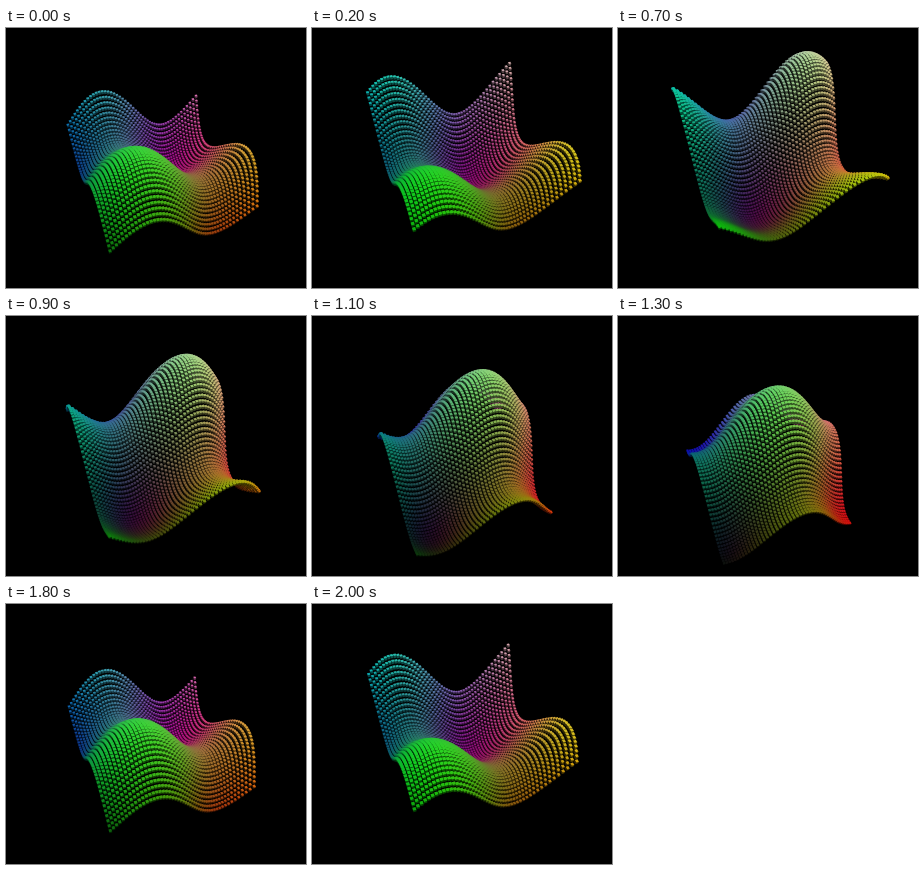
These frames come from a looping animation (300 by 260 pixels, 2.1 s). An HTML page with a canvas:

```html
<!DOCTYPE html>
<html lang="en">
<head>
<meta charset="utf-8">
<title>Wave of cubes</title>
<style>
  html, body { margin: 0; width: 100%; height: 100%; overflow: hidden; background: #000; }
  canvas { display: block; width: 300px; height: 260px; }
</style>
</head>
<body>
<canvas id="stage" width="300" height="260"></canvas>
<script>
const ctx = document.getElementById('stage').getContext('2d');
const LOOP = 2100, STEP = 100;
const N = 50;              // cubes per side
const HALF = 0.45 / N;     // half a cube in grid units
const RISE = 0.9 / N;      // half a cube in height units
const SPEED = 3.42, PHASE = -0.01;

// Perspective camera: x and z run 0..1 across the grid, h is -1..1
function project(x, z, h) {
  const w = 1 + 0.0945 * x + 0.1935 * z - 0.193 * h;
  return [
    (104 + 170.7 * x - 30 * z - 22.8 * h) / w,
    (223 - 28.2 * x - 107.2 * z - 73.3 * h) / w
  ];
}

function shade(rgb, gain, lift) {
  return 'rgb(' + rgb.map(v => Math.round(255 * Math.min(1, v * gain + lift))).join(',') + ')';
}

function quad(a, b, c, d, fill) {
  ctx.fillStyle = fill;
  ctx.beginPath();
  ctx.moveTo(a[0], a[1]);
  for (const p of [b, c, d]) ctx.lineTo(p[0], p[1]);
  ctx.fill();
}

function cube(x, z, h) {
  const rgb = [Math.pow(x, 1.2), Math.max(0, 0.5 + 0.5 * h), 0.8 * Math.pow(z, 1.1)];
  const x0 = x - HALF, x1 = x + HALF, z0 = z - HALF, z1 = z + HALF;
  const lo = h - RISE, hi = h + RISE;
  const nearLeft = project(x0, z0, hi), nearRight = project(x1, z0, hi);
  const farLeft = project(x0, z1, hi), farRight = project(x1, z1, hi);
  const footLeft = project(x0, z0, lo);
  quad(farLeft, nearLeft, footLeft, project(x0, z1, lo), shade(rgb, 0.18, 0));
  quad(nearLeft, nearRight, project(x1, z0, lo), footLeft, shade(rgb, 0.35, 0));
  quad(nearLeft, nearRight, farRight, farLeft, shade(rgb, 0.78, 0.05));
}

function draw(seconds) {
  const phase = SPEED * seconds + PHASE;
  const wave = u => 0.5 * Math.sin(2 * Math.PI * u + phase);
  ctx.fillStyle = '#000';
  ctx.fillRect(0, 0, 300, 260);
  // Far cubes first
  for (let j = N - 1; j >= 0; j--) {
    for (let i = N - 1; i >= 0; i--) {
      const x = i / (N - 1), z = j / (N - 1);
      cube(x, z, wave(x) + wave(z));
    }
  }
}

let shown = -1;
function tick() {
  const step = Math.floor(performance.now() % LOOP / STEP);
  if (step !== shown) {
    shown = step;
    draw(step * STEP / 1000);
  }
  requestAnimationFrame(tick);
}
tick();
</script>
</body>
</html>
```
